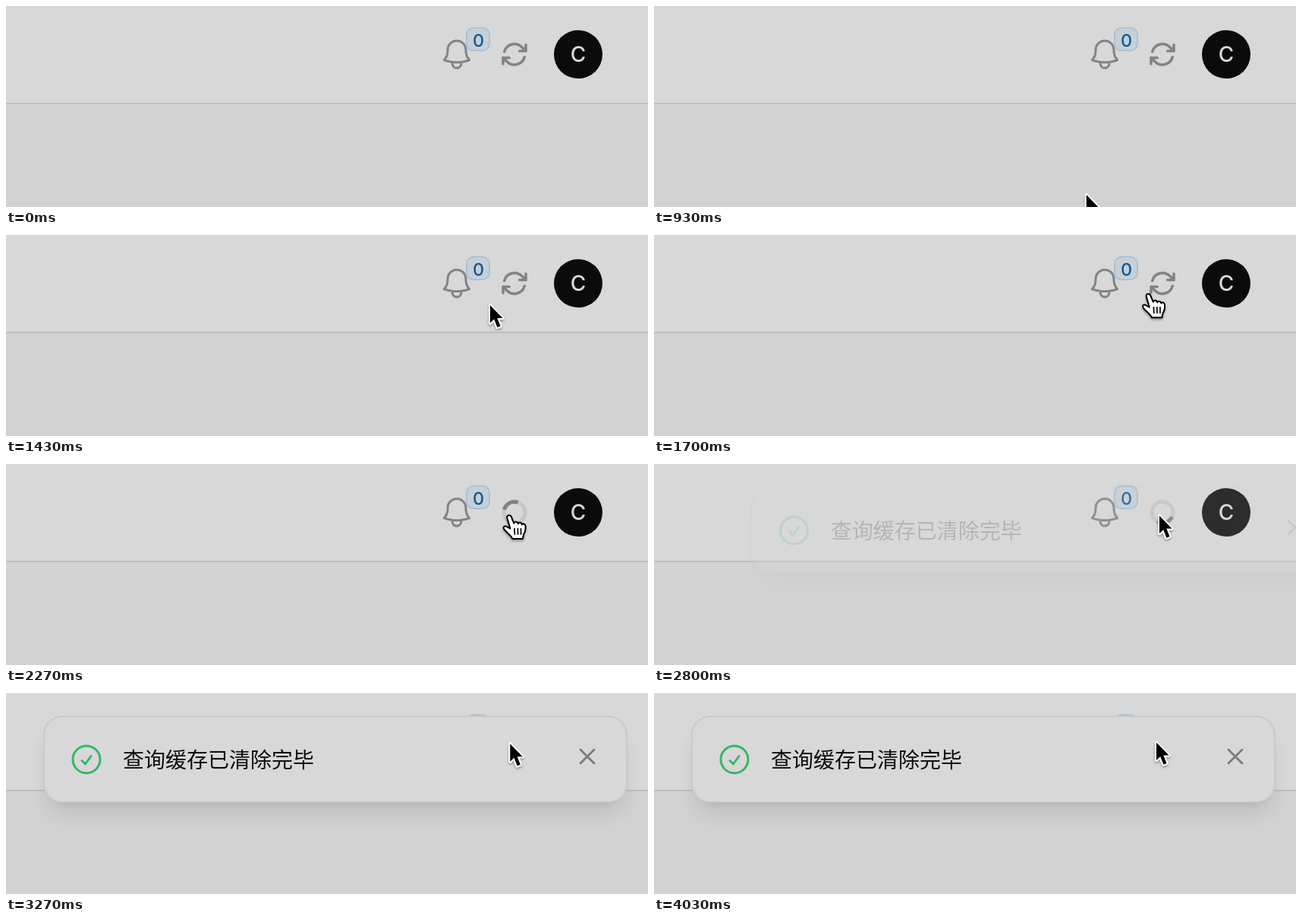
Write an HTML page that moves like this. It is 846 by 266 pixels and loops after 4960 ms.

```html
<!DOCTYPE html>
<html lang="zh-CN">
<head>
<meta charset="utf-8">
<title>Notification</title>
<style>
  html, body { margin: 0; width: 100%; height: 100%; overflow: hidden; background: #d2d2d2; }
  svg { display: block; width: 100%; height: 100%; }
  text { text-anchor: middle; font-family: Inter, "Liberation Sans", sans-serif; }
  .toast-text { text-anchor: start; font: 500 28px "Noto Sans CJK SC", "Noto Sans CJK", sans-serif; }
  .icon { fill: none; stroke: #838387; stroke-linecap: round; stroke-linejoin: round; }
</style>
</head>
<body>
<svg viewBox="0 0 846 266">
  <defs>
    <filter id="far" x="-20%" y="-80%" width="140%" height="260%"><feGaussianBlur stdDeviation="15"/></filter>
    <filter id="near" x="-20%" y="-50%" width="140%" height="200%"><feGaussianBlur stdDeviation="6"/></filter>
    <filter id="soft" x="-50%" y="-50%" width="200%" height="200%">
      <feDropShadow dx="0" dy="2" stdDeviation="1.6" flood-opacity=".35"/>
    </filter>
  </defs>

  <rect width="846" height="266" fill="#d2d2d2"/>
  <rect width="846" height="128" fill="#d8d8d8"/>
  <rect y="128" width="846" height="2" fill="#bebebe"/>

  <path class="icon" transform="translate(570 40) scale(2)" stroke-width="1.5"
    d="M14.857 17.082a23.848 23.848 0 0 0 5.454-1.31A8.967 8.967 0 0 1 18 9.75V9A6 6 0 0 0 6 9v.75a8.967 8.967 0 0 1-2.312 6.022c1.733.64 3.56 1.085 5.455 1.31m5.714 0a24.255 24.255 0 0 1-5.714 0m5.714 0a3 3 0 1 1-5.714 0"/>
  <rect x="607" y="29" width="30" height="30" rx="9" fill="#c8d0d6" stroke="#a9c2d7" stroke-width="2"/>
  <text x="622.5" y="53.5" font-size="23.5" font-weight="500" fill="#0f5b99">0</text>

  <path id="refresh" class="icon" transform="translate(650 44) scale(1.667)" stroke-width="2.1"
    d="M16.023 9.348h4.992M2.985 19.644v-4.992h4.992m-4.993 0 3.181 3.183a8.25 8.25 0 0 0 13.803-3.7M4.031 9.865a8.25 8.25 0 0 1 13.803-3.7l3.181 3.182v-4.991"/>
  <g id="spinner" fill="none" stroke-width="5">
    <circle cx="670" cy="64" r="14" stroke="#c6c6c6"/>
    <path id="arc" stroke="#808087"/>
  </g>

  <circle cx="754" cy="64" r="32" fill="#0b0b0c"/>
  <text x="754" y="74" font-size="28" font-weight="500" fill="#d8d8d8">C</text>

  <g id="toast">
    <rect x="56" y="57" width="756" height="101" rx="20" opacity=".1" filter="url(#far)"/>
    <rect x="58" y="47" width="752" height="97" rx="18" opacity=".1" filter="url(#near)"/>
    <rect x="49" y="30" width="770" height="115" rx="25" fill="#c9c9c9"/>
    <rect x="51" y="32" width="766" height="111.5" rx="23" fill="#d8d8d8"/>
    <path class="icon" transform="translate(82 64) scale(2)" stroke-width="1.5" style="stroke:#38b566"
      d="M9 12.75 11.25 15 15 9.75M21 12a9 9 0 1 1-18 0 9 9 0 0 1 18 0z"/>
    <text class="toast-text" x="154" y="98.5" fill="#0c0c0d">查询缓存已清除完毕</text>
    <path class="icon" d="M757 75l18 18m0-18-18 18" stroke-width="2.8" style="stroke:#7b7b80"/>
  </g>

  <g id="cursor" stroke-linejoin="round" stroke-linecap="round" filter="url(#soft)">
    <path id="arrow" d="M0 0V23.5L5.2 18.6 9.4 29.2 13.6 27.4 9.3 17.1H16.6Z"
      fill="#000" stroke="#fff" stroke-width="4" paint-order="stroke"/>
    <g id="hand" transform="translate(-666 -68.5)" stroke="#000" stroke-width="2">
      <path fill="#fff" d="M660.5 72C659 67.5 664.5 66.3 666 70.2L669.4 78.5C670.2 75.6 674 75.8 674.8 79C675.6 76.6 679.3 77.2 680 80.2C681 78.2 684.3 79 684.6 82.2C685 86.5 684 90.5 682 93.5L681 99H667.5C666 95 661 92 657 87.2C654.4 84 655.8 81.6 658.8 82.3L664.4 85.4Z"/>
      <path fill="none" stroke-width="1.7" d="M670 85.5l.4 7.5M674.4 85.5l.2 7.5M678.6 85.5l-.1 7.5"/>
    </g>
  </g>
</svg>
<script>
const LOOP = 4960;
const $ = id => document.getElementById(id);
const show = (id, on) => $(id).setAttribute('display', on ? 'inline' : 'none');
const clamp = v => Math.min(1, Math.max(0, v));
const span = (t, a, b) => clamp((t - a) / (b - a));
const mix = (a, b, p) => a.map((v, i) => v + (b[i] - v) * p);
const easeOut = p => 1 - (1 - p) ** 2;
const easeInOut = p => p * p * (3 - 2 * p);

const ENTER = [569.5, 250.5], PAUSE = [638, 93], BUTTON = [666, 68.5], REST = [662, 65.5];

function pointer(t) {
  if (t < 1450) return mix(ENTER, PAUSE, easeOut(span(t, 930, 1430)));
  if (t < 3000) return mix(PAUSE, BUTTON, easeInOut(span(t, 1450, 1900)));
  return mix(BUTTON, REST, span(t, 3250, 3300));
}

function arcPath(mid, r = 14, half = 47) {
  const at = deg => {
    const a = deg * Math.PI / 180;
    return `${670 + r * Math.cos(a)} ${64 + r * Math.sin(a)}`;
  };
  return `M${at(mid - half)}A${r} ${r} 0 0 1 ${at(mid + half)}`;
}

function draw(t) {
  const loading = t >= 2265;
  show('refresh', !loading);
  show('spinner', loading);
  $('arc').setAttribute('d', arcPath(242 + (t - 2270) * 0.36));

  // The toast glides in and fades with the same exponential decay.
  const left = Math.exp(-Math.max(0, t - 2791) / 56);
  show('toast', t >= 2791);
  $('toast').setAttribute('opacity', 1 - left);
  $('toast').setAttribute('transform', `translate(${94 * left} 0)`);

  const [x, y] = pointer(t);
  const over = t < 2340 && x > 650;
  show('cursor', t >= 925);
  show('hand', over);
  show('arrow', !over);
  $('cursor').setAttribute('transform', `translate(${x} ${y})`);
}

const start = performance.now();
function tick() {
  draw((performance.now() - start) % LOOP);
  requestAnimationFrame(tick);
}
tick();
</script>
</body>
</html>
```
